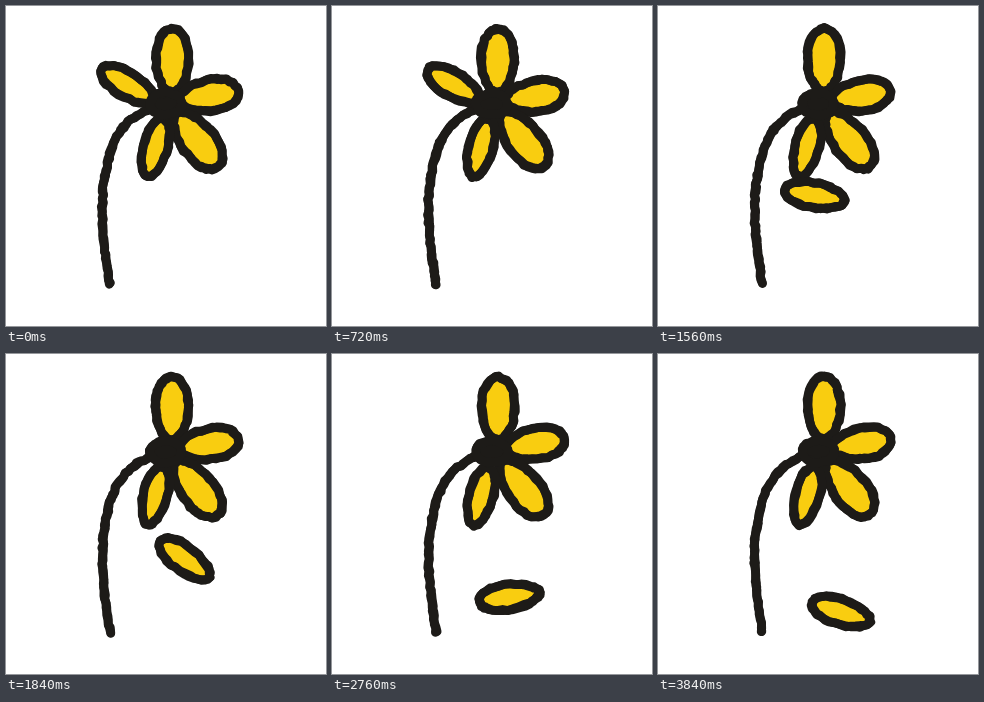
Write an HTML page that moves like this. It is 320 by 320 pixels and loops after 3880 ms.

```html
<!DOCTYPE html>
<html lang="en">
<head>
<meta charset="utf-8">
<title>Falling petal</title>
<style>
html, body { margin: 0; width: 100%; height: 100%; overflow: hidden; background: #fff; }
svg { display: block; width: 100vw; height: 100vh; }
path { stroke: #1d1b18; stroke-width: 8.8; stroke-linecap: round; stroke-linejoin: round; fill: none; }
.petal { fill: #f9cd10; }
.disc { fill: #1d1b18; }
</style>
</head>
<body>
<svg id="stage" viewBox="0 0 320 320"></svg>
<script>
const LOOP = 3880, TICK = 40, DRAWINGS = 65;
const TICKS = LOOP / TICK;

// Seeded random numbers, restarted for every drawing
let seed = 1;
function rand() {
  seed = (seed + 0x6D2B79F5) | 0;
  let t = Math.imul(seed ^ (seed >>> 15), 1 | seed);
  t = (t + Math.imul(t ^ (t >>> 7), 61 | t)) ^ t;
  return ((t ^ (t >>> 14)) >>> 0) / 4294967296;
}
const jitter = amount => (rand() * 2 - 1) * amount;

// Smooth curve through keys [time, ...values], level at both ends
function follow(keys, t) {
  const last = keys.length - 1;
  if (t <= keys[0][0]) return keys[0].slice(1);
  if (t >= keys[last][0]) return keys[last].slice(1);
  const i = keys.findIndex(k => k[0] > t) - 1;
  const a = keys[i], b = keys[i + 1], span = b[0] - a[0];
  const u = (t - a[0]) / span, v = 1 - u;
  const slope = (k, j) => k < 1 || k >= last ? 0 :
    (keys[k + 1][j] - keys[k - 1][j]) / (keys[k + 1][0] - keys[k - 1][0]);
  return a.slice(1).map((_, n) => {
    const j = n + 1;
    return v * v * (1 + 2 * u) * a[j] + u * u * (3 - 2 * u) * b[j] +
      span * u * v * (v * slope(i, j) - u * slope(i + 1, j));
  });
}

// Egg around (x, y); a positive taper makes the far end wider
function egg(x, y, angle, length, width, taper) {
  const r = angle * Math.PI / 180, c = Math.cos(r), s = Math.sin(r);
  const count = Math.round((length + width) * Math.PI / 4);
  return Array.from({ length: count }, (_, i) => {
    const a = i / count * 2 * Math.PI;
    const p = length * Math.cos(a);
    const q = width * Math.sin(a) * (1 + taper * Math.cos(a));
    return [x + p * c - q * s, y + p * s + q * c];
  });
}

// Stem: two cubic curves, the arch and the long straight part
function bezier(p, count) {
  return Array.from({ length: count + 1 }, (_, i) => {
    const u = i / count, v = 1 - u;
    return [0, 1].map(j => v * v * v * p[0][j] + 3 * v * v * u * p[1][j] +
      3 * v * u * u * p[2][j] + u * u * u * p[3][j]);
  });
}

const make = (tag, parent, cls = '') => {
  const el = document.createElementNS('http://www.w3.org/2000/svg', tag);
  el.setAttribute('class', cls);
  return parent.appendChild(el);
};

// Two jittered strokes over each other give both edges their own bumps
function shape(curve, cls) {
  const g = make('g', document.getElementById('stage'));
  return { g, curve, closed: cls !== '', layers: [make('path', g, cls), make('path', g)] };
}

function rough({ curve, closed }) {
  const bump = v => (v + jitter(1)).toFixed(1);
  return 'M' + curve.map(([x, y]) => bump(x) + ' ' + bump(y)).join('L') + (closed ? 'Z' : '');
}

const stem = shape([
  ...bezier([[146, 102], [115, 114], [105, 135], [99, 170]], 22),
  ...bezier([[99, 170], [93, 205], [98, 240], [104, 278]], 27)
], '');
const petals = [
  egg(166, 54, -90, 31.5, 16.5, 0.05),
  egg(203, 90, -9, 30, 15.5, 0.15),
  egg(191, 134, 52, 34, 16.5, 0.15),
  egg(149, 142, 105, 30, 12, -0.1)
].map(curve => shape(curve, 'petal'));
const leaf = shape(egg(0, 0, 0, 30.5, 12.5, -0.1), 'petal');
const disc = shape(egg(160, 98, 0, 16, 11, 0), 'disc');
const all = [stem, ...petals, leaf, disc];

// Loose petal: time, x, y, angle
const FALL = [
  [760, 122, 79, 31], [1000, 106, 118, -12], [1200, 108, 154, -42],
  [1520, 152, 186, 5], [1840, 181, 207, 37], [2360, 186, 216, -9],
  [2640, 176, 234, -18], [3040, 183, 258, 18]
];

function draw(ms) {
  const tick = Math.floor((ms % LOOP) / TICK);
  const drawing = Math.floor(tick * DRAWINGS / TICKS);
  const start = Math.ceil(drawing * TICKS / DRAWINGS) * TICK;
  seed = 977 * (drawing + 1);
  for (const s of all) {
    for (const path of s.layers) path.setAttribute('d', rough(s));
    s.g.setAttribute('transform', `translate(${jitter(0.4)} ${jitter(0.4)})`);
  }
  const [x, y, angle] = follow(FALL, start);
  leaf.g.setAttribute('transform', `translate(${x} ${y}) rotate(${angle})`);
}

const begin = performance.now();
function loop() {
  draw(performance.now() - begin);
  requestAnimationFrame(loop);
}
loop();
</script>
</body>
</html>
```
